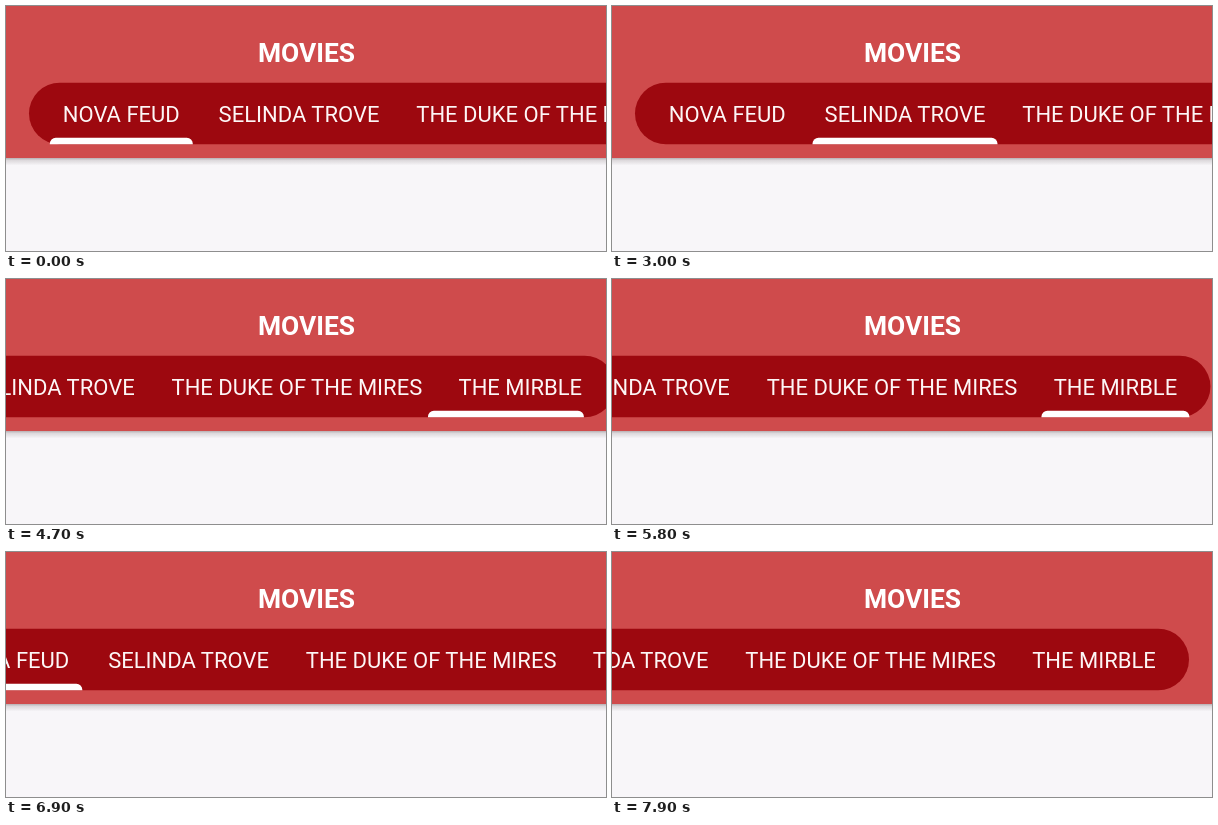
Write an HTML page that moves like this. It is 600 by 245 pixels and loops after 8000 ms.

```html
<!DOCTYPE html>
<html lang="en">
<head>
<meta charset="utf-8">
<title>Movies</title>
<style>
  html, body { margin: 0; width: 100%; height: 100%; overflow: hidden; background: #f8f6f9; }
  svg { display: block; width: 600px; height: 245px; }
  text { font-family: Roboto, "Liberation Sans", sans-serif; text-anchor: middle; fill: #fff; }
  .title { font-size: 26.4px; font-weight: 700; }
  .tab { font-size: 22px; fill: #fdf6f6; }
</style>
</head>
<body>
<svg viewBox="0 0 600 245">
  <defs>
    <linearGradient id="shade" x1="0" y1="0" x2="0" y2="1">
      <stop offset="0" stop-color="#4a3a3e" stop-opacity=".42"/>
      <stop offset=".35" stop-color="#4a3a3e" stop-opacity=".16"/>
      <stop offset="1" stop-color="#4a3a3e" stop-opacity="0"/>
    </linearGradient>
  </defs>
  <rect width="600" height="245" fill="#f8f6f9"/>
  <rect y="151.5" width="600" height="8" fill="url(#shade)"/>
  <rect width="600" height="152" fill="#cf4b4c"/>
  <text class="title" x="300.5" y="55.8">MOVIES</text>
  <g id="strip">
    <rect x="23" y="76.7" width="831" height="61.6" rx="30.8" fill="#9d080f"/>
    <path id="bar" fill="#fff"/>
  </g>
</svg>
<script>
const LOOP = 8000;
const tabs = [
  { name: "NOVA FEUD", mid: 115.3, width: 143 },
  { name: "SELINDA TROVE", mid: 293, width: 185 },
  { name: "THE DUKE OF THE MIRES", mid: 535.6, width: 272 },
  { name: "THE MIRBLE", mid: 759, width: 148 }
];

// Each move: start ms, end ms, value reached
const scrollMoves = [
  [3300, 3690, 244.7], [4730, 5100, 277], [5740, 6080, 0],
  [6740, 7110, 277], [7110, 7490, 30], [7510, 7890, 277]
];
const tabMoves = [
  [1850, 2150, 1], [3010, 3310, 2], [4450, 4750, 3], [6120, 6440, 0]
];

const strip = document.getElementById("strip");
const bar = document.getElementById("bar");

for (const { name, mid } of tabs) {
  const label = document.createElementNS("http://www.w3.org/2000/svg", "text");
  label.setAttribute("class", "tab");
  label.setAttribute("x", mid);
  label.setAttribute("y", 116.2);
  label.textContent = name;
  strip.appendChild(label);
}

const ease = p => (1 - Math.cos(Math.PI * p)) / 2;
const mix = (a, b, p) => a + (b - a) * p;

// The move under way at time t, starting from zero
function track(moves, t) {
  let from = 0;
  for (const [start, end, to] of moves) {
    if (t < start) break;
    if (t < end) return { from, to, p: ease((t - start) / (end - start)) };
    from = to;
  }
  return { from, to: from, p: 0 };
}

function draw(t) {
  const s = track(scrollMoves, t);
  strip.setAttribute("transform", `translate(${-mix(s.from, s.to, s.p)} 0)`);

  const m = track(tabMoves, t);
  const a = tabs[m.from], b = tabs[m.to];
  const w = mix(a.width, b.width, m.p);
  const x = mix(a.mid, b.mid, m.p) - w / 2;
  bar.setAttribute("d",
    `M${x} 138.3 v-.6 a6 6 0 0 1 6 -6 h${w - 12} a6 6 0 0 1 6 6 v.6 z`);
}

const began = performance.now();
function tick() {
  draw((performance.now() - began) % LOOP);
  requestAnimationFrame(tick);
}
draw(0);
requestAnimationFrame(tick);
</script>
</body>
</html>
```
